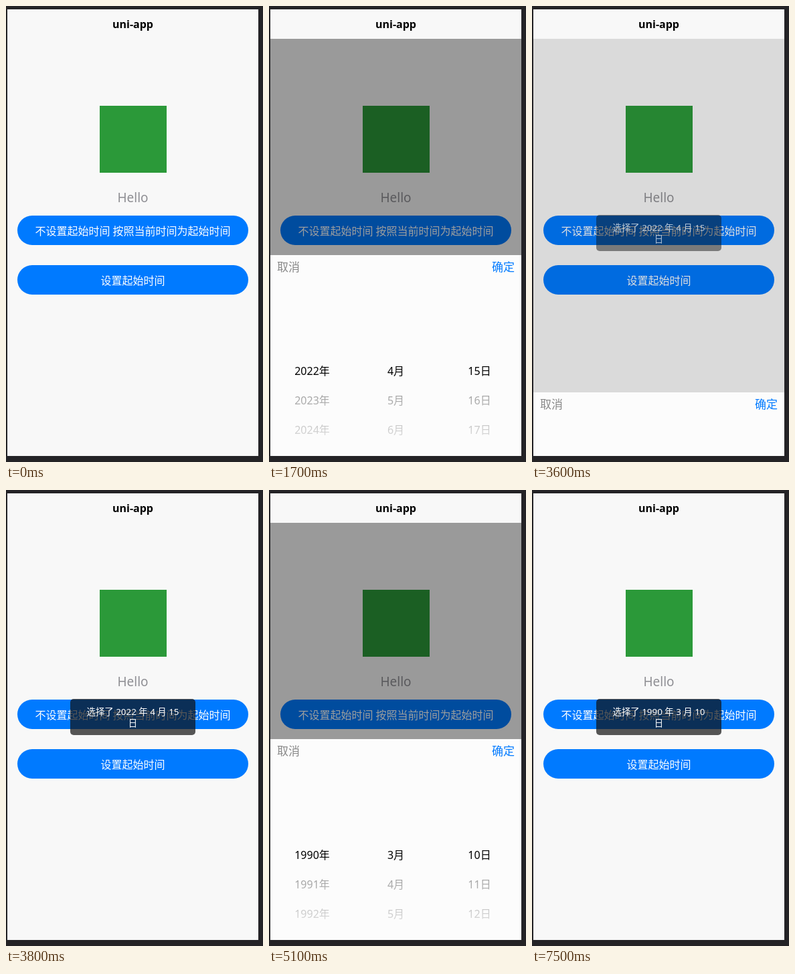
Recreate the animation shown at these times as an HTML page with a canvas. Size 384 by 681 pixels, loop 8000 ms.

```html
<!DOCTYPE html>
<html lang="zh-CN">
<head>
<meta charset="utf-8">
<title>uni-app</title>
<style>
  html, body { margin: 0; width: 100%; height: 100%; overflow: hidden; background: #242326; }
  canvas { display: block; width: 100vw; height: 100vh; }
</style>
</head>
<body>
<canvas id="stage" width="384" height="681"></canvas>
<script>
const ctx = document.getElementById('stage').getContext('2d');
const FONT = '"Noto Sans", "Noto Sans CJK SC", "Noto Sans CJK", sans-serif';
const LOOP = 8000, TICK = 100, DURATION = 300;
const PHONE = { x: 2, y: 5, w: 375, h: 667 };
const CENTER = 189.5, BOTTOM = 672, PANEL_H = 300, ROW_H = 44;
const BLUE = '#007aff';

const sessions = [
  { open: 1400, close: 3480, toastEnd: 4625, date: [2022, 4, 15] },
  { open: 4817, close: 7234, toastEnd: Infinity, date: [1990, 3, 10] }
];

// CSS "ease", cubic-bezier(.25, .1, .25, 1)
function ease(x) {
  if (x <= 0) return 0;
  if (x >= 1) return 1;
  const bezier = (a, b, s) => 3 * a * s * (1 - s) ** 2 + 3 * b * s * s * (1 - s) + s ** 3;
  let lo = 0, hi = 1;
  for (let i = 0; i < 24; i++) {
    const mid = (lo + hi) / 2;
    if (bezier(.25, .25, mid) < x) lo = mid; else hi = mid;
  }
  const y = bezier(.1, 1, lo);
  return y > .98 ? 1 : y;
}

const progress = (time, start) => ease((time - start) / DURATION);

function text(str, x, y, size, color, align = 'center', weight = 400) {
  ctx.font = `${weight} ${size}px ${FONT}`;
  ctx.textAlign = align;
  ctx.fillStyle = color;
  ctx.fillText(str, x, y);
}

function rect(x, y, w, h, color, radius = 0) {
  ctx.fillStyle = color;
  ctx.beginPath();
  ctx.roundRect(x, y, w, h, radius);
  ctx.fill();
}

function button(label, y) {
  rect(17, y, 345, 44, BLUE, 22);
  text(label, CENTER, y + 29, 16, '#fff');
}

function drawPage() {
  rect(PHONE.x, PHONE.y, PHONE.w, PHONE.h, '#f8f8f8');
  text('uni-app', CENTER, 33, 16, '#000', 'center', 700);
  rect(140, 149, 100, 100, '#2b9939');
  text('Hello', CENTER, 293, 19, '#8f8f94');
  button('不设置起始时间 按照当前时间为起始时间', 313);
  button('设置起始时间', 387);
}

function drawPicker(date, shown) {
  const top = Math.round(BOTTOM - PANEL_H * shown);
  rect(PHONE.x, 49, PHONE.w, BOTTOM - 49, `rgba(0,0,0,${.38 * shown})`);
  rect(PHONE.x, top, PHONE.w, PANEL_H, '#fcfcfc');
  text('取消', 12, top + 24, 17, '#888', 'left');
  text('确定', 367, top + 24, 17, BLUE, 'right');
  for (let row = 0; row < 3; row++) {
    ['年', '月', '日'].forEach((unit, col) =>
      text(date[col] + row + unit, 64.5 + 125 * col, top + 179 + ROW_H * row, 16, '#000'));
  }
  const fade = ctx.createLinearGradient(0, top + 195, 0, top + PANEL_H);
  fade.addColorStop(0, 'rgba(252,252,252,.6)');
  fade.addColorStop(1, 'rgba(252,252,252,.95)');
  rect(PHONE.x, top + 195, PHONE.w, PANEL_H - 195, fade);
}

function drawToast([year, month, day], alpha) {
  ctx.globalAlpha = alpha;
  rect(96, 312, 187, 54, 'rgba(17,17,17,.7)', 5);
  text(`选择了 ${year} 年 ${month} 月 ${day}`, CENTER, 336, 13.4, '#fff', 'center', 500);
  text('日', CENTER, 353, 13.4, '#fff', 'center', 500);
  ctx.globalAlpha = 1;
}

function draw(time) {
  rect(0, 0, 384, 681, '#242326');
  ctx.save();
  ctx.beginPath();
  ctx.rect(PHONE.x, PHONE.y, PHONE.w, PHONE.h);
  ctx.clip();
  drawPage();
  for (const { open, close, toastEnd, date } of sessions) {
    const closed = progress(time, close);
    const shown = progress(time, open) - closed;
    const toast = closed - progress(time, toastEnd);
    if (shown > 0) drawPicker(date, shown);
    if (toast > 0) drawToast(date, toast);
  }
  ctx.restore();
}

const start = performance.now();
function frame() {
  const time = (performance.now() - start) % LOOP;
  draw(Math.floor(time / TICK) * TICK);
  requestAnimationFrame(frame);
}
frame();
</script>
</body>
</html>
```
